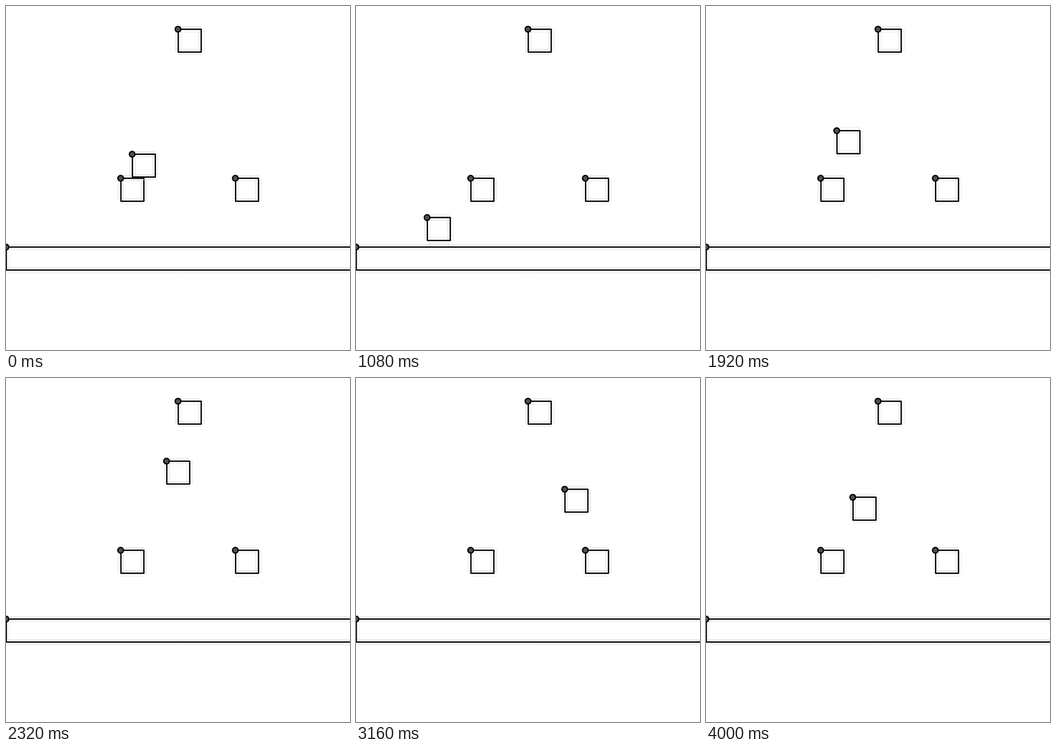
An HTML page with a canvas that plays this animation: 640 by 640 pixels, repeating every 4.04 s.

```html
<!DOCTYPE html>
<html lang="en">
<head>
<meta charset="utf-8">
<title>Jumping box</title>
<style>
  html, body { margin: 0; width: 100%; height: 100%; overflow: hidden; background: #fff; }
  canvas { display: block; width: 640px; height: 640px; }
</style>
</head>
<body>
<canvas id="stage" width="640" height="640"></canvas>
<script>
const ctx = document.getElementById('stage').getContext('2d');
const LOOP = 4040, STEP = 40, TICKS_PER_MS = 0.06;
const SCALE = 640 / 300, SIZE = 20;
const SPEED = 2, JUMP = 5, GRAVITY = 0.25;
const WAKE = 17;          // the player rests until this tick

const blocks = [
  { x: 150, y: 20, w: SIZE },
  { x: 100, y: 150, w: SIZE },
  { x: 200, y: 150, w: SIZE },
  { x: 0, y: 210, w: 320 }
];

// Ticks during which each key is held
const keys = {
  left: [[18, 42], [177, 227]],
  right: [[76, 102], [126, 172], [229, 243]],
  jump: [[63, 79], [127, 148], [182, 187], [234, 236]]
};
const held = (key, tick) => keys[key].some(([from, to]) => tick >= from && tick < to);

const overlaps = (p, b) =>
  p.x < b.x + b.w && p.x + SIZE > b.x && p.y < b.y + SIZE && p.y + SIZE > b.y;

function advance(p, tick) {
  p.x += SPEED * (held('right', tick) - held('left', tick));
  if (held('jump', tick)) p.vy = -JUMP;
  p.vy += GRAVITY;
  p.y += p.vy;
  const hit = blocks.find(b => overlaps(p, b));
  if (hit) {
    p.y = p.vy > 0 ? hit.y - SIZE - 1 : hit.y + SIZE + 1;
    p.vy = 0;
  }
}

function playerAt(t) {
  const p = { x: 110, y: 129, w: SIZE, vy: 0 };
  const end = Math.floor(t * TICKS_PER_MS + 1e-6);
  for (let tick = WAKE; tick < end; tick++) advance(p, tick);
  return p;
}

function line(x0, y0, x1, y1) {
  ctx.beginPath();
  ctx.moveTo(x0, y0);
  ctx.lineTo(x1, y1);
  ctx.stroke();
}

const crisp = v => Math.floor(v) + 0.5;

function drawBox(box) {
  const x = box.x * SCALE + 0.5, y = box.y * SCALE + 0.5;
  const w = box.w * SCALE, h = SIZE * SCALE;

  // faint parallel lines on both sides of each edge
  ctx.strokeStyle = '#e4e4e4';
  ctx.lineWidth = 1;
  for (const d of [-5, 5]) {
    for (const ey of [y, y + h]) line(x, crisp(ey + d), x + w, crisp(ey + d));
    for (const ex of [x, x + w]) line(crisp(ex + d), y, crisp(ex + d), y + h);
  }

  ctx.strokeStyle = '#000';
  ctx.lineWidth = 2.5;
  ctx.lineJoin = 'round';
  ctx.strokeRect(x, y, w, h);

  ctx.fillStyle = '#505050';
  ctx.beginPath();
  ctx.arc(x - 0.5, y, 5.2, 0, Math.PI * 2);
  ctx.fill();
  ctx.stroke();
}

function render(t) {
  ctx.fillStyle = '#fff';
  ctx.fillRect(0, 0, 640, 640);
  blocks.forEach(drawBox);
  drawBox(playerAt(t));
}

const begin = performance.now();
function loop() {
  const t = (performance.now() - begin) % LOOP;
  render(Math.floor(t / STEP) * STEP);
  requestAnimationFrame(loop);
}
loop();
</script>
</body>
</html>
```
